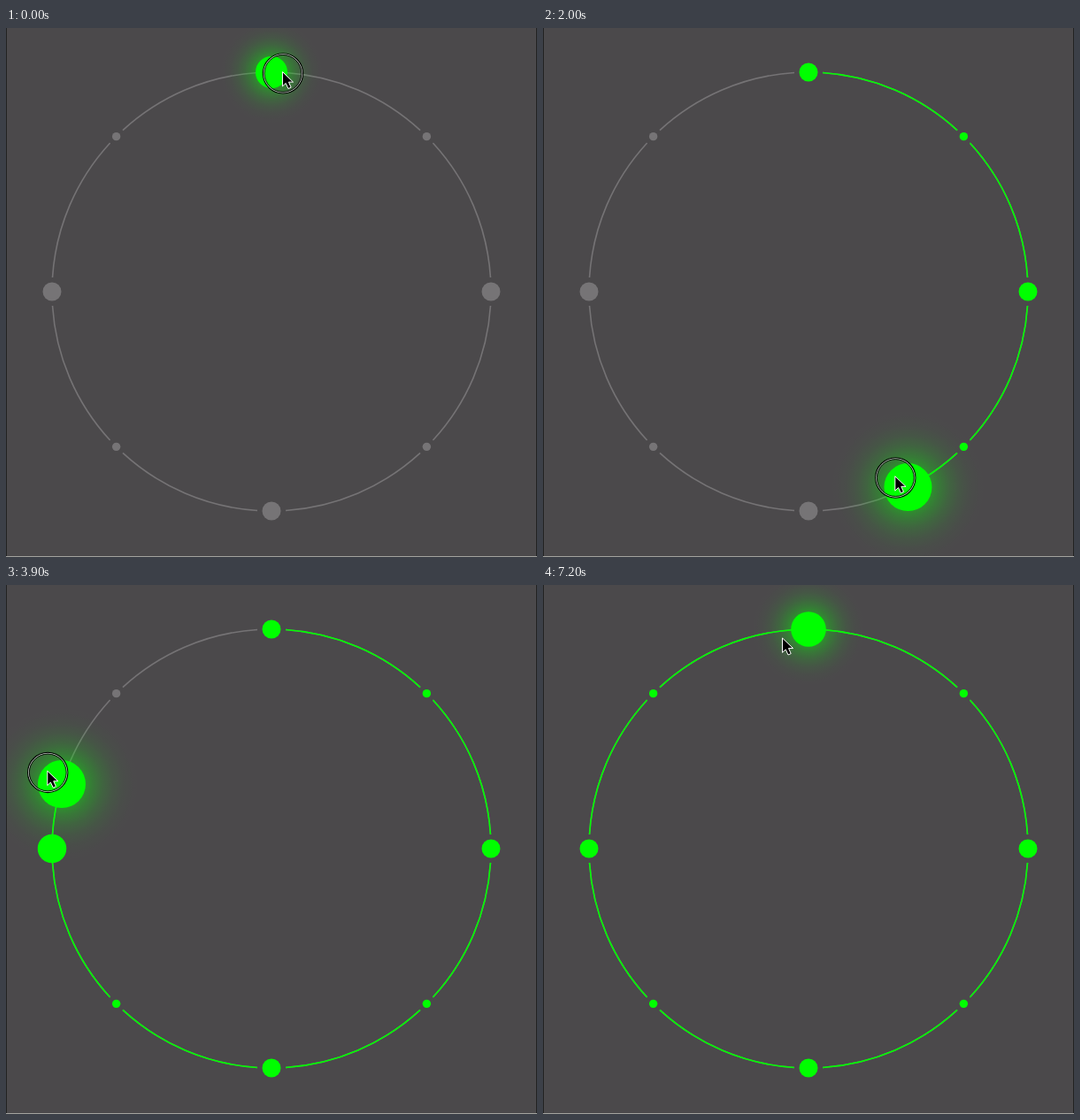
Write an HTML page that moves like this. It is 600 px wide and 598 px high and loops after 7.3 s.

```html
<!DOCTYPE html>
<html lang="en">
<head>
<meta charset="utf-8">
<title>Circular drag slider</title>
<style>
  html, body { margin: 0; width: 100%; height: 100%; overflow: hidden; background: #4b494b; }
  svg { display: block; width: 100vw; height: 100vh; }
</style>
</head>
<body>
<svg viewBox="0 0 600 598">
  <defs>
    <radialGradient id="glow"></radialGradient>
  </defs>
  <rect width="600" height="598" fill="#4b494b"/>
  <g id="track" fill="none" stroke-width="1.6"></g>
  <g id="marks"></g>
  <g id="knob">
    <circle r="62" fill="url(#glow)"/>
    <circle r="18" fill="#0f0"/>
  </g>
  <path d="M.5 0V598M599.5 0V598" stroke="#222"/>
  <path d="M0 597.5H600" stroke="#a3a39f"/>
  <g id="cursor">
    <g id="halo" fill="none">
      <circle r="22.6" stroke="#000" stroke-width="1.2"/>
      <circle r="21.6" stroke="#ddd" stroke-width=".9"/>
      <circle r="20.9" stroke="#000" stroke-width=".9"/>
    </g>
    <path d="M-.5-1.8V14.6L3.2 11.1 6 17.2 9.2 15.8 6.5 9.8H11.6Z"
      stroke="#fff" stroke-linejoin="round"/>
  </g>
</svg>
<script>
const LOOP = 7300, STEP = 100, LAG = 20, SNAP = 7.5;
const CX = 300, CY = 298, R = 248;
const GRAY = [118, 116, 118], GREEN = [0, 255, 0];
const PULSE = 320, FADE = 150;

// Hand path: time, degrees clockwise from the top, distance from the centre
const TIME = 0, ANGLE = 1, REACH = 2;
const hand = [
  [0, 3, 247], [800, 76, 243], [1500, 106.8, 239], [2400, 193.5, 227], [3200, 229.5, 248],
  [3900, 288.8, 267], [4500, 334.7, 248], [5600, 345, 240], [5700, 353, 238]
];

const $ = id => document.getElementById(id);
const clamp = x => Math.max(0, Math.min(1, x));
const ramp = (t, from, to) => clamp((t - from) / (to - from));

// Reads column `out` where column `by` has the given value.
function read(by, value, out) {
  const i = hand.findIndex((k, n) => n && k[by] >= value);
  const [a, b] = i < 0 ? hand.slice(-2) : [hand[i - 1], hand[i]];
  return a[out] + (b[out] - a[out]) * ramp(value, a[by], b[by]);
}

// The knob trails the hand and snaps to the top at either end.
function knobAngle(t) {
  const a = read(TIME, t - LAG, ANGLE);
  return a < SNAP ? 0 : a > 360 - SNAP ? 360 : a;
}

function polar(deg, r = R) {
  const a = deg * Math.PI / 180;
  return [CX + r * Math.sin(a), CY - r * Math.cos(a)];
}

function arc(from, to) {
  return to > from ? `M${polar(from)}A${R} ${R} 0 0 1 ${polar(to)}` : '';
}

function add(parent, tag, attrs) {
  const el = document.createElementNS('http://www.w3.org/2000/svg', tag);
  for (const k in attrs) el.setAttribute(k, attrs[k]);
  return $(parent).appendChild(el);
}

const mix = f => `rgb(${GRAY.map((c, i) => Math.round(c + (GREEN[i] - c) * f))})`;
const gap = i => i % 2 ? 2.35 : 3.7;

for (let x = 0; x <= 1; x += 0.125) {
  add('glow', 'stop', { offset: x, 'stop-color': '#0f0', 'stop-opacity': 0.9 * (1 - x) ** 2.6 });
}

const spans = [], marks = [];
for (let i = 0; i < 8; i++) {
  const [cx, cy] = polar(i * 45);
  const big = i % 2 === 0;
  spans.push([i * 45 + gap(i), (i + 1) * 45 - gap(i + 1)]);
  marks.push({
    el: add('marks', 'circle', { cx, cy }),
    r: big ? 10.5 : 4.7,
    swell: big ? 6.3 : 0,
    hit: i ? read(ANGLE, i * 45, TIME) + LAG : -LOOP
  });
}
add('track', 'path', { d: spans.map(s => arc(...s)).join(''), stroke: '#757375' });
const trail = add('track', 'path', { stroke: '#0f0' });

function draw(t) {
  const angle = knobAngle(t);
  trail.setAttribute('d', spans.map(([a, b]) => arc(a, Math.min(b, angle))).join(''));

  for (const { el, r, swell, hit } of marks) {
    el.setAttribute('r', r + swell * Math.sin(Math.PI * ramp(t, hit, hit + PULSE)));
    el.setAttribute('fill', mix(ramp(t, hit, hit + FADE)));
  }

  const size = 1 + 0.5 * ramp(t, 0, 300) - 0.4 * ramp(t, 7000, 7200);
  const tip = polar(read(TIME, t, ANGLE), read(TIME, t, REACH));
  $('knob').setAttribute('transform', `translate(${polar(angle)}) scale(${size})`);
  $('cursor').setAttribute('transform', `translate(${tip})`);
  $('halo').setAttribute('opacity', 1 - ramp(t, 6400, 6600));
}

const start = performance.now();
function tick() {
  const t = (performance.now() - start) % LOOP;
  draw(Math.floor(t / STEP) * STEP);
  requestAnimationFrame(tick);
}
tick();
</script>
</body>
</html>
```
